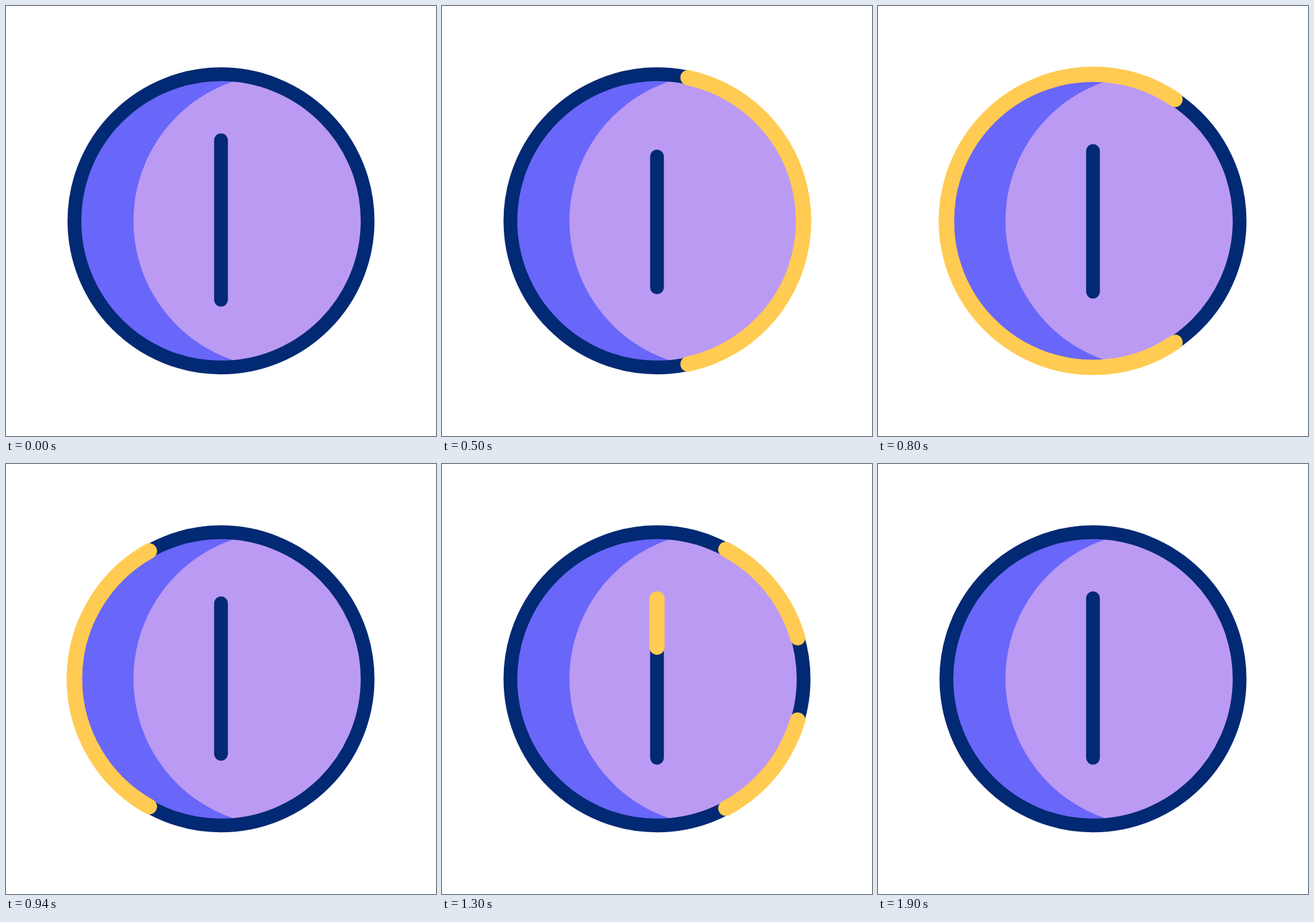
Animation, 640 px wide and 640 px high, one loop 2.72 s. Source, as an HTML page:

```html
<!DOCTYPE html>
<html lang="en">
<head>
<meta charset="utf-8">
<title>Coin outline</title>
<style>
  html, body { margin: 0; width: 100%; height: 100%; overflow: hidden; background: #fff; }
  svg { display: block; width: 100%; height: 100%; }
  .ink, .glow { fill: none; stroke-linecap: round; stroke-linejoin: round; }
  .ink { stroke: #022973; stroke-width: 20.5; }
  .glow { stroke: #ffcb52; stroke-width: 22.8; visibility: hidden; }
</style>
</head>
<body>
<svg viewBox="0 0 640 640">
  <clipPath id="disc"><circle cx="320" cy="319.8" r="218"/></clipPath>
  <g clip-path="url(#disc)">
    <rect width="640" height="640" fill="#6966fa"/>
    <circle cx="408.9" cy="319.8" r="219.2" fill="#bb9af3"/>
  </g>
  <circle class="ink" cx="320" cy="319.8" r="218.2"/>
  <line class="ink" id="bar" x1="320" x2="320"/>
  <g transform="translate(320 319.8)">
    <path class="glow ring" pathLength="1" d="M218.2 0A218.2 218.2 0 0 1 -218.2 0A218.2 218.2 0 0 1 218.2 0"/>
    <path class="glow ring" pathLength="1" d="M218.2 0A218.2 218.2 0 0 0 -218.2 0A218.2 218.2 0 0 0 218.2 0"/>
  </g>
  <path class="glow stem" pathLength="1" d="M320 200.6V438.4V200.6"/>
</svg>
<script>
  const LOOP = 2720, STEP = 20;
  const bar = document.getElementById('bar');
  const rings = document.querySelectorAll('.ring');
  const stems = document.querySelectorAll('.stem');

  const progress = (t, from, to) => Math.min(1, Math.max(0, (t - from) / (to - from)));
  const smooth = u => u * u * (3 - 2 * u);
  const ease = (t, from, to) => smooth(progress(t, from, to));

  // Ease in and out with x handles x1 and x2, solved by bisection.
  function bezier(x, x1, x2) {
    let lo = 0, hi = 1;
    for (let i = 0; i < 24; i++) {
      const m = (lo + hi) / 2, n = 1 - m;
      if (3 * x1 * m * n * n + 3 * x2 * m * m * n + m * m * m < x) lo = m; else hi = m;
    }
    return smooth((lo + hi) / 2);
  }

  function trim(paths, start, end, shown) {
    const length = end - start;
    for (const p of paths) {
      p.style.visibility = shown && length > 1e-5 ? 'visible' : 'hidden';
      p.style.strokeDasharray = `${Math.max(length, 1e-5)} 3`;
      p.style.strokeDashoffset = -start;
    }
  }

  function draw(t) {
    const squeeze = t < 550 ? ease(t, 80, 550) : 1 - ease(t, 550, 1160);
    bar.setAttribute('y1', 199.8 + 25 * squeeze);
    bar.setAttribute('y2', 437.2 - 19 * squeeze);

    trim(rings, ease(t, 544, 1571), ease(t, 80, 1480), t > 80 && t < 1480);

    const head = t > 1110 ? bezier(progress(t, 1110, 1960), 0.33, 0.516) : 0;
    trim(stems, ease(t, 1438, 1962), head, t > 1110 && t < 1900);
  }

  const origin = performance.now();
  function tick() {
    const t = (performance.now() - origin) % LOOP;
    draw(Math.floor(t / STEP) * STEP);
    requestAnimationFrame(tick);
  }
  draw(0);
  requestAnimationFrame(tick);
</script>
</body>
</html>
```
